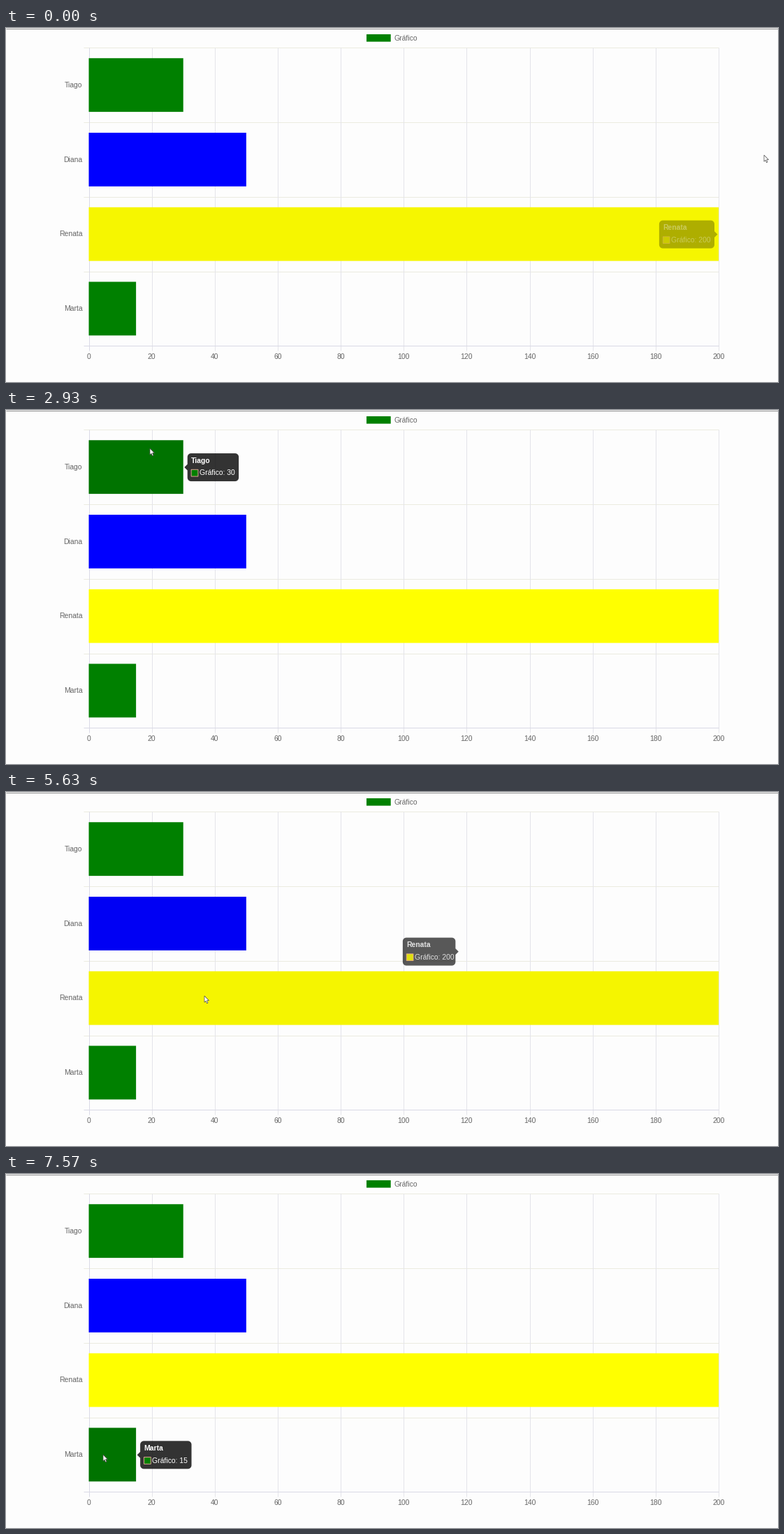
A matplotlib script that plays this animation: 1105x507 px, repeating every 8 s.

```python
import numpy as np
import matplotlib.pyplot as plt
from matplotlib.animation import FuncAnimation
from matplotlib.collections import LineCollection
from matplotlib.colors import to_rgb
from matplotlib.patches import Polygon, Rectangle

W, H, DPI = 1105, 507, 64
PT = 72 / DPI  # points per pixel
LOOP, STEP = 8000, 20
FONT = 10.4

SERIES = "Gráfico"
NAMES = ["Tiago", "Diana", "Renata", "Marta"]
VALUES = [30, 50, 200, 15]
COLORS = [np.array(to_rgb(c)) for c in ("green", "blue", "yellow", "green")]

LEFT, RIGHT, TOP, BOTTOM = 118.5, 1020, 28.3, 455.3
UNIT = (RIGHT - LEFT) / 200
ROW = (BOTTOM - TOP) / 4
BAR_H = 0.72 * ROW
TIP_H, CARET, GAP, RADIUS = 40, 4.4, 6, 5.2
FADE = 400

# hovered bar, time of entering and of leaving it
VISITS = [(2, -1000, -80), (0, 2440, 4106), (1, 4160, 5552),
          (2, 5586, 6908), (3, 6945, LOOP)]

# pointer moves: start, end, where to
ORIGIN = (1085, 182)
MOVES = [(1670, 2440, (209, 53)), (2500, 2930, (206, 55)),
         (3928, 4321, (263, 207)), (5509, 5658, (286, 301)),
         (6300, 6370, (281, 299)), (6730, 7086, (139, 402))]
ARROW = np.array([(0, 0), (0, 9.2), (2.1, 7.3), (3.5, 10.7),
                  (5, 10), (3.6, 6.7), (6.5, 6.7)])


def center(i):
    return TOP + ROW * (i + 0.5)


def bar_end(i):
    return LEFT + UNIT * VALUES[i]


def opens_left(i):
    return bar_end(i) + 100 > W


def tip_state(i):
    """x, y, width, opacity, then the hover amount of each bar."""
    width = 62 + 5.7 * len(str(VALUES[i]))
    x = bar_end(i) + (-GAP - width if opens_left(i) else GAP)
    return np.r_[x, center(i) - TIP_H / 2 + 0.4, width, 1, np.eye(4)[i]]


def hover_at(t):
    """Replay the visits, each change easing on from where the last one was."""
    state = goal = tip_state(VISITS[0][0])
    begin = VISITS[0][1]

    def ease(now):
        p = np.clip((now - begin) / FADE, 0, 1)
        return state + (goal - state) * (1 - (1 - p) ** 4)

    for bar, enter, leave in VISITS:
        if enter > t:
            break
        shown = bar
        state, goal, begin = ease(enter), tip_state(bar), enter
        if leave <= t:
            state, begin = ease(leave), leave
            goal = np.r_[goal[:3], np.zeros(5)]
    return ease(t), shown


def pointer_at(t):
    spot = np.array(ORIGIN, float)
    for start, end, to in MOVES:
        s = np.clip((t - start) / (end - start), 0, 1)
        spot += (np.array(to) - spot) * s * s * (3 - 2 * s)
    return np.round(spot)


def tip_outline(x, y, w, right):
    """Rounded box with a caret on its left or right side."""
    arc = np.linspace(0, np.pi / 2, 8)
    parts = []
    for k in range(4):
        cx = x + (RADIUS if k in (1, 2) else w - RADIUS)
        cy = y + (TIP_H - RADIUS if k < 2 else RADIUS)
        a = arc + k * np.pi / 2
        parts.append(np.c_[cx + RADIUS * np.cos(a), cy + RADIUS * np.sin(a)])
    mid = y + TIP_H / 2
    edge, out = (x + w, CARET) if right else (x, -CARET)
    caret = [(edge, mid - out), (edge + out, mid), (edge, mid + out)]
    parts.insert(4 if right else 2, np.array(caret))
    return np.vstack(parts)


fig = plt.figure(figsize=(W / DPI, H / DPI), dpi=DPI, facecolor="#fdfdfd")
ax = fig.add_axes([0, 0, 1, 1])
ax.set_xlim(0, W)
ax.set_ylim(H, 0)
ax.axis("off")


def label(x, y, s, color="#666666", **kw):
    return ax.text(x, y, s, color=color, family="Liberation Sans",
                   fontsize=FONT * PT, va="baseline", **kw)


def lines(segments, color):
    ax.add_collection(LineCollection(segments, colors=color, linewidths=PT, zorder=1))


def box(x, y, w, h, **kw):
    return ax.add_patch(Rectangle((x, y), w, h, snap=False, **kw))


# grid and axes
ticks = [LEFT + 20 * UNIT * k for k in range(11)]
lines([[(111, TOP + ROW * k), (RIGHT, TOP + ROW * k)] for k in range(4)], "#ebebe0")
lines([[(x, TOP), (x, 462)] for x in ticks[1:]], "#e4e4ea")
lines([[(LEFT, TOP), (LEFT, 462)], [(111, BOTTOM), (RIGHT, BOTTOM)]], "#d9d9e6")
lines([[(0, 0.5), (W, 0.5)]], "#8c8c8c")
for k, x in enumerate(ticks):
    label(x, 474.3, str(20 * k), ha="center")

# legend
box(516, 9, 34.7, 10.6, fc=COLORS[0], lw=0, zorder=2)
label(555.7, 17.6, SERIES)

bars = []
for i, name in enumerate(NAMES):
    label(109.3, center(i) + 3.1, name, ha="right")
    bars.append(box(LEFT, center(i) - BAR_H / 2, bar_end(i) - LEFT, BAR_H,
                    fc=COLORS[i], lw=0, zorder=2))

# tooltip and pointer
tip = ax.add_patch(Polygon(np.zeros((3, 2)), fc="black", lw=0, zorder=5))
swatch = box(0, 0, 9.8, 9.8, ec="#f2a8a0", lw=0.9 * PT, zorder=6)
title = label(0, 0, "", "white", weight="bold", zorder=6)
body = label(0, 0, "", "white", zorder=6)
pointer = ax.add_patch(Polygon(ARROW, fc="white", ec="#4a4a4a", lw=0.7 * PT, zorder=8))


def draw(n):
    t = (n + 0.5) * STEP
    state, i = hover_at(t)
    x, y, w, opacity = state[:4]

    for bar, color, amount in zip(bars, COLORS, state[4:]):
        bar.set_facecolor(color * (1 - 0.1 * amount))

    tip.set_xy(tip_outline(x, y, w, opens_left(i)))
    tip.set_alpha(0.8 * opacity)
    swatch.set_xy((x + 5.4, y + 23.2))
    swatch.set_facecolor(COLORS[i])
    title.set_position((x + 5, y + 13.5))
    title.set_text(NAMES[i])
    body.set_position((x + 17.3, y + 31.3))
    body.set_text(f"{SERIES}: {VALUES[i]}")
    for part in (swatch, title, body):
        part.set_alpha(opacity)
    for part in (tip, swatch, title, body):
        part.set_visible(opacity > 0.004)

    pointer.set_xy(ARROW + pointer_at(t))
    return [*bars, tip, swatch, title, body, pointer]


anim = FuncAnimation(fig, draw, frames=LOOP // STEP, interval=STEP,
                     repeat=True, repeat_delay=0)
plt.show()
```
